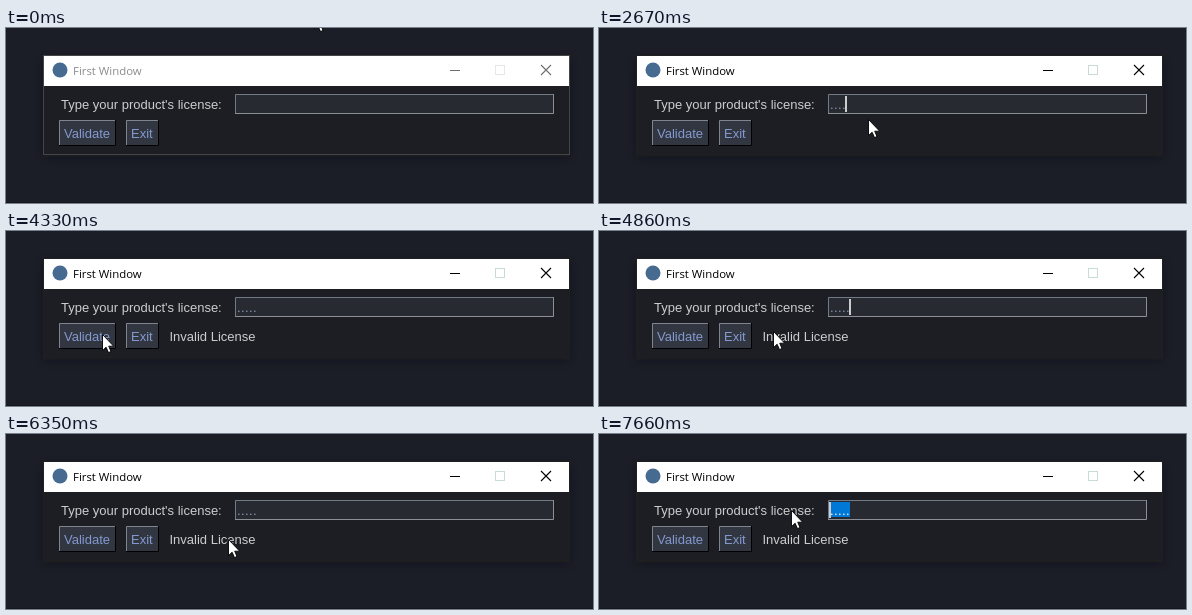
These frames come from a looping animation (587x175 px, 8 s). An HTML page:

```html
<!DOCTYPE html>
<html lang="en">
<head>
<meta charset="utf-8">
<title>First Window</title>
<style>
  html, body { margin: 0; width: 100%; height: 100%; overflow: hidden; background: #1b1e26; }
  svg { display: block; }
  path { fill: none; }
  text { font: 13px "Liberation Sans", Arial, sans-serif; fill: #cccdcf; white-space: pre; }
  #title { font: 11.4px "Open Sans", "Noto Sans", sans-serif; }
  .button rect { fill: #313641; }
  .button text { fill: #8499cf; }
  .lit { stroke: #7f848e; }
  .shade { stroke: #000; }
  .pressed .lit { stroke: #000; }
  .pressed .shade { stroke: #7f848e; }
  .pressed text { transform: translate(1px, 1px); }
  #dots { letter-spacing: .39px; fill: #8c98b0; }
  #dots.selected { fill: #fff; }
</style>
</head>
<body>
<svg width="587" height="175" viewBox="0 0 587 175">
  <defs>
    <filter id="blur" x="-10%" y="-30%" width="120%" height="160%"><feGaussianBlur stdDeviation="5"/></filter>
  </defs>
  <rect width="587" height="175" fill="#1b1e26"/>
  <rect y="174" width="587" height="1" fill="#15171d"/>
  <rect x="38" y="32" width="525" height="97" fill="#0d0e12" opacity=".45" filter="url(#blur)"/>

  <rect x="38" y="28" width="525" height="98" fill="#1c1e23"/>
  <rect id="border" x="37.5" y="27.5" width="526" height="99" fill="none"/>
  <rect x="38" y="28" width="525" height="30" fill="#fff"/>
  <circle cx="54" cy="42" r="7.5" fill="#476a91"/>
  <text id="title" x="67" y="47">First Window</text>
  <path id="controls" d="M444 42.5h10M535 37l10 10m0-10l-10 10" stroke-width="1.1"/>
  <rect id="maximise" x="489.5" y="37.5" width="9" height="9" fill="none"/>

  <text x="55" y="81">Type your product's license:</text>
  <rect x="229" y="66" width="319" height="20" fill="#272a31"/>
  <path d="M229.5 86V66.5H548" stroke="#717b86"/>
  <path d="M229 85.5H547.5V66" stroke="#8b9096"/>
  <rect id="selection" y="68" height="15" fill="#0078d7"/>
  <text id="dots" x="231" y="81"></text>
  <rect id="caret" y="68" width="2" height="16" fill="#cccdcf"/>

  <g class="button" id="validate">
    <rect x="53" y="92" width="57" height="26"/>
    <path class="lit" d="M53.5 117V92.5H109"/>
    <path class="shade" d="M53 117.5H109.5V92"/>
    <text x="58" y="110">Validate</text>
  </g>
  <g class="button">
    <rect x="120" y="92" width="33" height="26"/>
    <path class="lit" d="M120.5 117V92.5H152"/>
    <path class="shade" d="M120 117.5H152.5V92"/>
    <text x="125" y="110">Exit</text>
  </g>
  <text id="message" x="163.5" y="110">Invalid License</text>

  <path id="arrow" d="M.5 .5V16.6L4.1 13.2L6.5 18.6L9 17.5L6.7 12.2H11.7Z" style="fill:#fff" stroke="#000" stroke-width=".9"/>
  <path id="beam" d="M-3 -7.5h2.5M.5 -7.5h2.5M0 -7V7M-3 7.5h2.5M.5 7.5h2.5" stroke="#e4e2dc"/>
</svg>
<script>
const LOOP = 8000;
const ACTIVATE = 880, FOCUS = 1020, PRESS = 4060, RELEASE = 4140, DRAG = 6850;
const KEY_COUNT = 5, CHAR = 4, FIELD_X = 230;

// Typing slows down from key to key
const keyTime = i => 1910 + 140 * i + 5.3 * i ** 3;

const linear = p => p;
const smooth = p => p * p * (3 - 2 * p);
const sway = p => 1 - Math.cos(2.5 * Math.PI * p);

// Each move runs from the previous resting point; arc bows it downwards
const START = { x: 308, y: -15 };
const MOVES = [
  { from: 100, to: 620, x: 309, y: 79, ease: smooth },
  { from: 2210, to: 2930, x: 246, y: 97, ease: linear },
  { from: 3030, to: 3880, x: 96, y: 103, ease: smooth, arc: 10 },
  { from: 4330, to: 5130, x: 202, y: 105.5, ease: smooth, arc: -6 },
  { from: 5150, to: 6350, x: 221.5, y: 105.5, ease: sway, arc: 3 },
  { from: 6350, to: DRAG, x: 266, y: 77, ease: linear },
  { from: DRAG, to: 7350, x: 179, y: 64, ease: smooth },
  { from: 7540, to: 7660, x: 192, y: 76, ease: linear }
];

const $ = id => document.getElementById(id);
const set = (id, attrs) => { for (const k in attrs) $(id).setAttribute(k, attrs[k]); };
const show = (id, on) => set(id, { visibility: on ? "visible" : "hidden" });
const clamp = (v, lo, hi) => Math.min(hi, Math.max(lo, v));
const lerp = (a, b, p) => a + (b - a) * p;
const grey = (a, b, p) => `rgb(${Array(3).fill(Math.round(lerp(a, b, p)))})`;

function pointerAt(t) {
  let { x, y } = START;
  for (const m of MOVES) {
    const p = clamp((t - m.from) / (m.to - m.from), 0, 1);
    const e = m.ease(p);
    x = lerp(x, m.x, e);
    y = lerp(y, m.y, e) + (m.arc || 0) * Math.sin(Math.PI * p);
  }
  return { x: Math.round(x), y: Math.round(y) };
}

function drawWindow(t) {
  const active = clamp((t - ACTIVATE) / 180, 0, 1);
  set("title", { style: `fill:${grey(140, 0, active)}` });
  set("controls", { stroke: grey(110, 0, active) });
  set("maximise", { stroke: active < 1 ? "#e4e8e6" : "#c6dcd5" });
  set("border", { stroke: grey(69, 32, active) });
  $("validate").classList.toggle("pressed", t >= PRESS && t < RELEASE);
  show("message", t >= RELEASE);
}

function drawPointer({ x, y }) {
  const inField = x >= 229 && x < 548 && y >= 66 && y < 86;
  show("arrow", !inField);
  show("beam", inField);
  set("arrow", { transform: `translate(${x} ${y})` });
  set("beam", { transform: `translate(${x + 1.5} ${y})` });
}

function drawField(t, pointer) {
  let count = 0;
  while (count < KEY_COUNT && t >= keyTime(count)) count++;
  const index = t < DRAG ? count : clamp(Math.round((pointer.x - FIELD_X) / CHAR), 0, count);
  const selected = count - index;
  $("dots").textContent = ".".repeat(count);
  $("dots").classList.toggle("selected", selected > 0);
  show("selection", selected > 0);
  set("selection", { x: FIELD_X + 1 + CHAR * index, width: CHAR * selected });

  // The caret blinks 600 ms on, 300 ms off, restarting at each key
  const blinkStart = count ? keyTime(count - 1) : FOCUS;
  show("caret", t >= FOCUS && (t - blinkStart) % 900 < 600);
  set("caret", { x: FIELD_X + CHAR * index });
}

function render(t) {
  const pointer = pointerAt(t);
  drawWindow(t);
  drawField(t, pointer);
  drawPointer(pointer);
}

function tick() {
  render(performance.now() % LOOP);
  requestAnimationFrame(tick);
}
tick();
</script>
</body>
</html>
```
